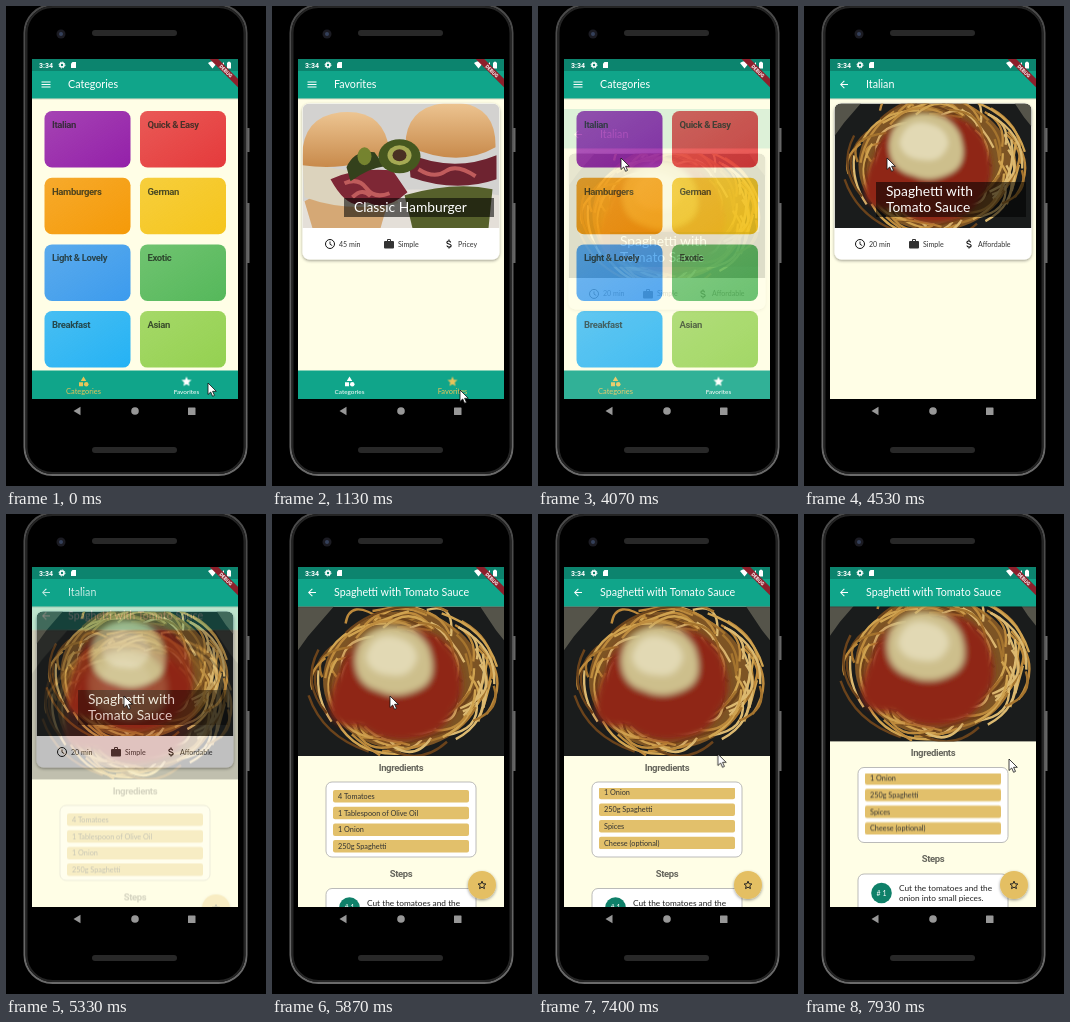
An HTML page for the animation above (8 s loop, 260x480 px).

```html
<!DOCTYPE html>
<html lang="en">
<head>
<meta charset="utf-8">
<title>Recipe app</title>
<style>
html, body { margin: 0; width: 100%; height: 100%; overflow: hidden; background: #000; }
svg { display: block; }
#stage { width: 260px; height: 480px; font-family: Lato, sans-serif; }
.head { font: bold 9.5px Roboto, sans-serif; letter-spacing: -.36px; }
.mid { text-anchor: middle; }

#cats, #favs, #home .tab, #home .label, #italian, #detail, #scroll, #items, #cursor {
  animation: 8s linear infinite;
}

/* tabs */
#cats { animation-name: cats; }
#favs { animation-name: favs; }
@keyframes cats {
  0%, 10.37%, 30.75%, 100% { opacity: 1; }
  10.375%, 30.745% { opacity: 0; }
}
@keyframes favs {
  0%, 10.37%, 30.75%, 100% { opacity: 0; }
  10.375%, 30.745% { opacity: 1; }
}
#home .tab.a { animation-name: tintA; }
#home .tab.b { animation-name: tintB; }
#home .a .label { animation-name: growA; }
#home .b .label { animation-name: growB; }
@keyframes tintA {
  0%, 10.375%, 33%, 100% { fill: #e6c45a; }
  13%, 30.75% { fill: #fff; }
}
@keyframes tintB {
  0%, 10.375%, 33%, 100% { fill: #fff; }
  13%, 30.75% { fill: #e6c45a; }
}
@keyframes growA {
  0%, 10.375%, 33%, 100% { transform: scale(1.17); }
  13%, 30.75% { transform: scale(1); }
}
@keyframes growB {
  0%, 10.375%, 33%, 100% { transform: scale(1); }
  13%, 30.75% { transform: scale(1.17); }
}

/* page pushes: fade in while rising */
#italian { animation-name: fade1, rise1; }
#detail { animation-name: fade2, rise2; }
@keyframes fade1 {
  0%, 49.7% { opacity: 0; animation-timing-function: ease-in; }
  53.45%, 100% { opacity: 1; }
}
@keyframes rise1 {
  0%, 49.7% { transform: translateY(85px); animation-timing-function: cubic-bezier(.4, 0, .2, 1); }
  53.45%, 100% { transform: none; }
}
@keyframes fade2 {
  0%, 64.9% { opacity: 0; animation-timing-function: ease-in; }
  68.65%, 100% { opacity: 1; }
}
@keyframes rise2 {
  0%, 64.9% { transform: translateY(85px); animation-timing-function: cubic-bezier(.4, 0, .2, 1); }
  68.65%, 100% { transform: none; }
}

/* scrolling */
#items { animation-name: items; }
@keyframes items {
  0%, 83.5% { transform: translateY(0); }
  85.875% { transform: translateY(-6.2px); }
  90%, 100% { transform: translateY(-36.7px); }
}
#scroll { animation-name: scroll; }
@keyframes scroll {
  0%, 96.9% { transform: translateY(0); }
  99.125%, 100% { transform: translateY(-14.5px); }
}

#cursor { animation-name: cursor; animation-timing-function: ease-in-out; }
@keyframes cursor {
  0%, .875% { transform: translate(202px, 377px); }
  5%, 18.375% { transform: translate(188px, 384px); }
  27.5%, 35.5% { transform: translate(74px, 377px); }
  43.375%, 60.875% { transform: translate(83px, 152px); }
  64.125%, 76.6% { transform: translate(118px, 182px); }
  82.5%, 83.5% { transform: translate(176px, 275px); animation-timing-function: linear; }
  85.875% { transform: translate(176px, 268px); animation-timing-function: linear; }
  90%, 91.5% { transform: translate(176px, 237px); }
  95.5%, 96.9% { transform: translate(205px, 260px); animation-timing-function: linear; }
  99.125%, 100% { transform: translate(205px, 245px); }
}
</style>
</head>
<body>
<svg id="stage" viewBox="0 0 260 480" width="260" height="480">
  <defs>
    <clipPath id="screen"><rect x="26" y="53" width="206" height="340"/></clipPath>
    <clipPath id="cardTop"><path d="M30.5 222V104.5a7 7 0 0 1 7-7h183a7 7 0 0 1 7 7V222z"/></clipPath>
    <clipPath id="listBox"><rect x="55" y="274" width="148" height="64.5"/></clipPath>
    <filter id="shadow" x="-20%" y="-20%" width="140%" height="150%">
      <feDropShadow dx="0" dy="1.2" stdDeviation="1.4" flood-opacity=".4"/>
    </filter>
    <filter id="soft" x="-20%" y="-20%" width="140%" height="140%"><feGaussianBlur stdDeviation="3"/></filter>
    <linearGradient id="bun" x2="0" y2="1">
      <stop stop-color="#edc592"/><stop offset="1" stop-color="#c88a4b"/>
    </linearGradient>
    <linearGradient id="rim" x2="0" y2="1">
      <stop stop-color="#4a4a4a"/><stop offset=".5" stop-color="#5c5c5c"/><stop offset="1" stop-color="#6a6a6a"/>
    </linearGradient>

    <symbol id="menu" viewBox="0 0 24 24"><path d="M3 18h18v-2H3zm0-5h18v-2H3zm0-7v2h18V6z"/></symbol>
    <symbol id="back" viewBox="0 0 24 24"><path d="M20 11H7.83l5.59-5.59L12 4l-8 8 8 8 1.41-1.41L7.83 13H20z"/></symbol>
    <symbol id="shapes" viewBox="0 0 24 24"><path d="M12 2l-5.5 9h11zM3 13.5h8v8H3z"/><circle cx="17.5" cy="17.5" r="4.5"/></symbol>
    <symbol id="star" viewBox="0 0 24 24"><path d="M12 17.3 18.2 21l-1.7-7L22 9.2l-7.2-.6L12 2 9.2 8.6 2 9.2 7.5 14l-1.7 7z"/></symbol>
    <symbol id="starLine" viewBox="0 0 24 24"><path d="M12 16.3 16.9 19.2l-1.3-5.5 4.2-3.7-5.6-.5L12 4.4 9.8 9.5l-5.6.5 4.2 3.7-1.3 5.5z" fill="none" stroke="#222" stroke-width="2"/></symbol>
    <symbol id="clock" viewBox="0 0 24 24"><path d="M12 7v5.5l4.5 2.7" fill="none" stroke="#111" stroke-width="1.8"/><circle cx="12" cy="12" r="9" fill="none" stroke="#111" stroke-width="2"/></symbol>
    <symbol id="work" viewBox="0 0 24 24"><path d="M20 6h-4V4a2 2 0 0 0-2-2h-4a2 2 0 0 0-2 2v2H4a2 2 0 0 0-2 2v11a2 2 0 0 0 2 2h16a2 2 0 0 0 2-2V8a2 2 0 0 0-2-2zm-6 0h-4V4h4z"/></symbol>
    <symbol id="money" viewBox="0 0 24 24"><path d="M15.2 9C15 6.8 13.5 6 11.5 6 9.3 6 7.7 7 7.7 8.8c0 4.1 8.7 2.2 8.7 6.5 0 1.7-1.7 2.8-4.2 2.8-2.6 0-4.2-1.1-4.3-3.1M12 3v3M12 18v3" fill="none" stroke="#111" stroke-width="2.3"/></symbol>

    <symbol id="burger" viewBox="0 0 197 125" preserveAspectRatio="xMidYMid slice">
      <rect width="197" height="125" fill="#d3d2d0"/>
      <path d="M0 98q90-20 197-6v33H0z" fill="#e4dfd8"/>
      <path d="M2 98q30-18 82 6l-6 21H10z" fill="#d5a875"/>
      <path d="M102 92q50-14 88-6l-4 39h-76z" fill="#56602b"/>
      <path d="M0 60q40 6 86 14l10 26q-50 10-94-6z" fill="#dcd3bd"/>
      <path d="M0 62Q-4 14 38 9q44-4 49 39-38 21-87 14z" fill="url(#bun)"/>
      <path d="M103 42Q103 2 148-1q46 0 45 45-38 22-90-2z" fill="url(#bun)"/>
      <path d="M106 50q44 20 88 2v24q-40 14-86-2z" fill="#6e2330"/>
      <path d="M28 76q24-12 62-9l15 22q-22 20-40 10-19 10-37-23z" fill="#7e2735"/>
      <path d="M42 80q14-6 22 5t23 5M116 66q16 10 27 2t30 5M50 94q10-10 18-1" fill="none" stroke="#c05c5c" stroke-width="4"/>
      <path d="M44 64q8-18 28-15l10 14q-16 2-34 15z" fill="#34411c"/>
      <ellipse cx="97" cy="53" rx="21" ry="17" fill="#46571f"/>
      <ellipse cx="97" cy="52" rx="12" ry="10" fill="#a5a953"/>
      <ellipse cx="97" cy="52" rx="7" ry="6" fill="#4a3023"/>
      <ellipse cx="62" cy="53" rx="7" ry="9" fill="#75832f"/>
    </symbol>

    <symbol id="pasta" viewBox="0 0 206 150" preserveAspectRatio="xMidYMid slice">
      <rect width="206" height="150" fill="#1a1c1c"/>
      <path d="M0 0h36L10 30 0 44zM206 0h-24l16 24 8 10z" fill="#55544a"/>
      <ellipse cx="105" cy="74" rx="80" ry="69" fill="#7d5424"/>
      <g id="noodles" fill="none" stroke-width="2.4"></g>
      <g filter="url(#soft)">
        <path d="M42 66q8-38 54-44 52-4 64 36 10 30-6 48-10 26-48 28-26 0-42-14-36 2-32-24 2-16 10-30z" fill="#8f2715"/>
        <path d="M57 53q2-27 30-33 32-2 44 22 10 30-8 40-22 12-42 3-24-6-24-32z" fill="#cdbf8c"/>
        <path d="M68 50q6-22 26-20 24 4 25 22-6 20-25 17-24-1-26-19z" fill="#e2d9b4"/>
      </g>
    </symbol>
  </defs>

  <rect width="260" height="480"/>
  <g id="phone">
    <path d="M240 122h3.5v24H240zM240 197h3.5v60H240z" fill="#666"/>
    <rect x="18.5" y="-1" width="222" height="470" rx="28" fill="#000" stroke="url(#rim)" stroke-width="2"/>
    <rect x="20.5" y="1" width="218" height="466" rx="26" fill="none" stroke="#242424" stroke-width="2"/>
    <circle cx="55" cy="28" r="4.5" fill="#1b1b22"/>
    <circle cx="55" cy="28" r="2" fill="#34405a"/>
    <rect x="86" y="24" width="85" height="6" rx="3" fill="#282828"/>
    <rect x="86" y="441" width="85" height="6" rx="3" fill="#282828"/>
    <g fill="#979797">
      <path d="M67.5 405l7-4.2v8.4z"/>
      <circle cx="129" cy="405" r="3.8"/>
      <rect x="182" y="401.5" width="7.5" height="7.5" rx=".6"/>
    </g>
  </g>

  <g clip-path="url(#screen)">
    <g id="home"></g>
    <g id="italian"></g>
    <g id="detail"></g>

    <rect x="26" y="53" width="206" height="12" fill="#000" opacity=".2"/>
    <g fill="#fff">
      <text x="33" y="61.5" style="font: bold 7px Roboto, sans-serif">3:34</text>
      <circle cx="56" cy="59" r="2" fill="none" stroke="#fff" stroke-width="1.6"/>
      <circle cx="56" cy="59" r="3" fill="none" stroke="#fff" stroke-dasharray="1.2 1.156"/>
      <path d="M66.5 56H70v6h-5v-4.5z"/>
      <path d="M202 57q4.5-3.5 9 0l-4.5 5.5zM218 56v6h-6zM221 56.5h1v-.8h2v.8h1V62.5h-4z"/>
    </g>
    <g transform="translate(232 53) rotate(45)">
      <rect x="-21" y="14" width="42" height="6" fill="#8d1f2b"/>
      <text class="mid" y="18.8" fill="#fff" style="font: bold 5px Roboto, sans-serif">DEBUG</text>
    </g>
  </g>

  <path id="cursor" d="M0 0V11.5L2.7 9l1.9 4.3 1.9-.9L4.6 8.3H8.3z" fill="#fff" stroke="#111" stroke-width=".8"/>
</svg>

<script>
const $ = id => document.getElementById(id);
const icon = (id, cx, cy, size = 12) =>
  `<use href="#${id}" x="${cx - size / 2}" y="${cy - size / 2}" width="${size}" height="${size}"/>`;
const text = (x, y, size, str, extra = '') =>
  `<text x="${x}" y="${y}" font-size="${size}" ${extra}>${str}</text>`;
const head = (x, y, str, extra = '') => `<text class="head ${extra}" x="${x}" y="${y}">${str}</text>`;

const paper = '<rect x="26" y="53" width="206" height="340" fill="#fffee6"/>';
const appBar = (button, title) => `
  <rect x="26" y="53" width="206" height="39.5" fill="#10a58a"/>
  <rect x="26" y="92.5" width="206" height="1" opacity=".15"/>
  <g fill="#fff">${icon(button, 40, 78.5)}${text(62, 82.3, 10.7, title)}</g>`;

const tile = ([name, color], i) => {
  const x = i % 2 ? 134 : 38.5, y = 105 + (i >> 1) * 66.7;
  return `<linearGradient id="g${i}" x2="1" y2="1">
      <stop stop-color="${color}" stop-opacity=".84"/><stop offset="1" stop-color="${color}"/>
    </linearGradient>
    <rect x="${x}" y="${y}" width="86" height="56.5" rx="7.5" fill="url(#g${i})"/>
    <g fill="rgba(30,40,30,.78)">${head(x + 7.5, y + 17, name)}</g>`;
};

const card = (photo, lines, facts) => {
  const top = 208 - lines.length * 16;
  const names = lines.map((s, i) => text(82, top + 14.2 + i * 16, 13.8, s)).join('');
  const row = facts.map(([id, x, s]) => icon(id, x, 238) + text(x + 9, 240.5, 7.1, s)).join('');
  return `<rect x="30.5" y="97.5" width="197" height="156" rx="7" fill="#fff" filter="url(#shadow)"/>
    <g clip-path="url(#cardTop)">
      <use href="#${photo}" x="30.5" y="97.5" width="197" height="124.5"/>
    </g>
    <rect x="72" y="${top}" width="150" height="${211 - top}" opacity=".56"/>
    <g fill="#fff">${names}</g><g fill="#333">${row}</g>`;
};

const tab = (cls, id, x, name) => `<g class="tab ${cls}">${icon(id, x, 375.5)}
  <g transform="translate(${x} 388)"><text class="label mid" font-size="6.4">${name}</text></g></g>`;

const kinds = [
  ['Italian', '#9420a9'], ['Quick &amp; Easy', '#e53a3b'],
  ['Hamburgers', '#f59a08'], ['German', '#f5c51c'],
  ['Light &amp; Lovely', '#3c9bed'], ['Exotic', '#55b85a'],
  ['Breakfast', '#25b2f4'], ['Asian', '#94d150']
];

$('home').innerHTML = paper + `
  <g id="cats">${kinds.map(tile).join('')}${appBar('menu', 'Categories')}</g>
  <g id="favs">${appBar('menu', 'Favorites')}
    ${card('burger', ['Classic Hamburger'],
      [['clock', 58, '45 min'], ['work', 117, 'Simple'], ['money', 177, 'Pricey']])}</g>
  <rect x="26" y="364.5" width="206" height="29" fill="#10a58a"/>
  ${tab('a', 'shapes', 77.5, 'Categories')}${tab('b', 'star', 180.5, 'Favorites')}`;

$('italian').innerHTML = paper + appBar('back', 'Italian') +
  card('pasta', ['Spaghetti with', 'Tomato Sauce'],
    [['clock', 56, '20 min'], ['work', 110, 'Simple'], ['money', 165, 'Affordable']]);

const foods = ['4 Tomatoes', '1 Tablespoon of Olive Oil', '1 Onion', '250g Spaghetti', 'Spices', 'Cheese (optional)'];
const item = (s, i) => {
  const y = 276 + i * 16.7;
  return `<rect x="61" y="${y}" width="136" height="12.5" rx="2" fill="#e2c06b"/>` +
    text(66, y + 8.8, 7.3, s, 'fill="#333"');
};
const box = (y, h) =>
  `<rect x="54" y="${y}" width="150" height="${h}" rx="6" fill="#fff" stroke="#aaa" stroke-width=".8"/>`;

$('detail').innerHTML = paper + `
  <g id="scroll">
    <use href="#pasta" x="26" y="92.5" width="206" height="149.5"/>
    <g fill="#65655c">${head(129, 256.5, 'Ingredients', 'mid')}${head(129, 362.5, 'Steps', 'mid')}</g>
    ${box(268, 75)}
    <g clip-path="url(#listBox)"><g id="items">${foods.map(item).join('')}</g></g>
    ${box(374.5, 60)}
    <circle cx="77.5" cy="393.5" r="10.3" fill="#0f8069"/>
    ${text(77.5, 396, 7, '# 1', 'class="mid" fill="#fff"')}
    <g fill="#222">${text(95, 391.8, 8.3, 'Cut the tomatoes and the')}${text(95, 401.5, 8.3, 'onion into small pieces.')}</g>
  </g>
  ${appBar('back', 'Spaghetti with Tomato Sauce')}
  <circle cx="210" cy="371" r="14" fill="#e4bf63" filter="url(#shadow)"/>
  ${icon('starLine', 210, 371)}`;

// seeded strands around the plate
let seed = 7;
const rnd = () => (seed = seed * 16807 % 2147483647) / 2147483647;
const golds = ['#d0a350', '#dcb970', '#a5742e', '#6b431b', '#bd8a3c'];
$('noodles').innerHTML = Array.from({ length: 110 }, (_, i) => {
  const a = rnd() * 6.283, r = .55 + rnd() * .5, bend = .4 + rnd() * .6;
  const at = (t, k) => `${(105 + 87 * k * Math.cos(t)).toFixed(1)} ${(74 + 74 * k * Math.sin(t)).toFixed(1)}`;
  return `<path d="M${at(a, r)}Q${at(a + bend / 2, r + rnd() * .4 - .1)} ${at(a + bend, r + rnd() * .3 - .2)}" stroke="${golds[i % 5]}"/>`;
}).join('');
</script>
</body>
</html>
```
